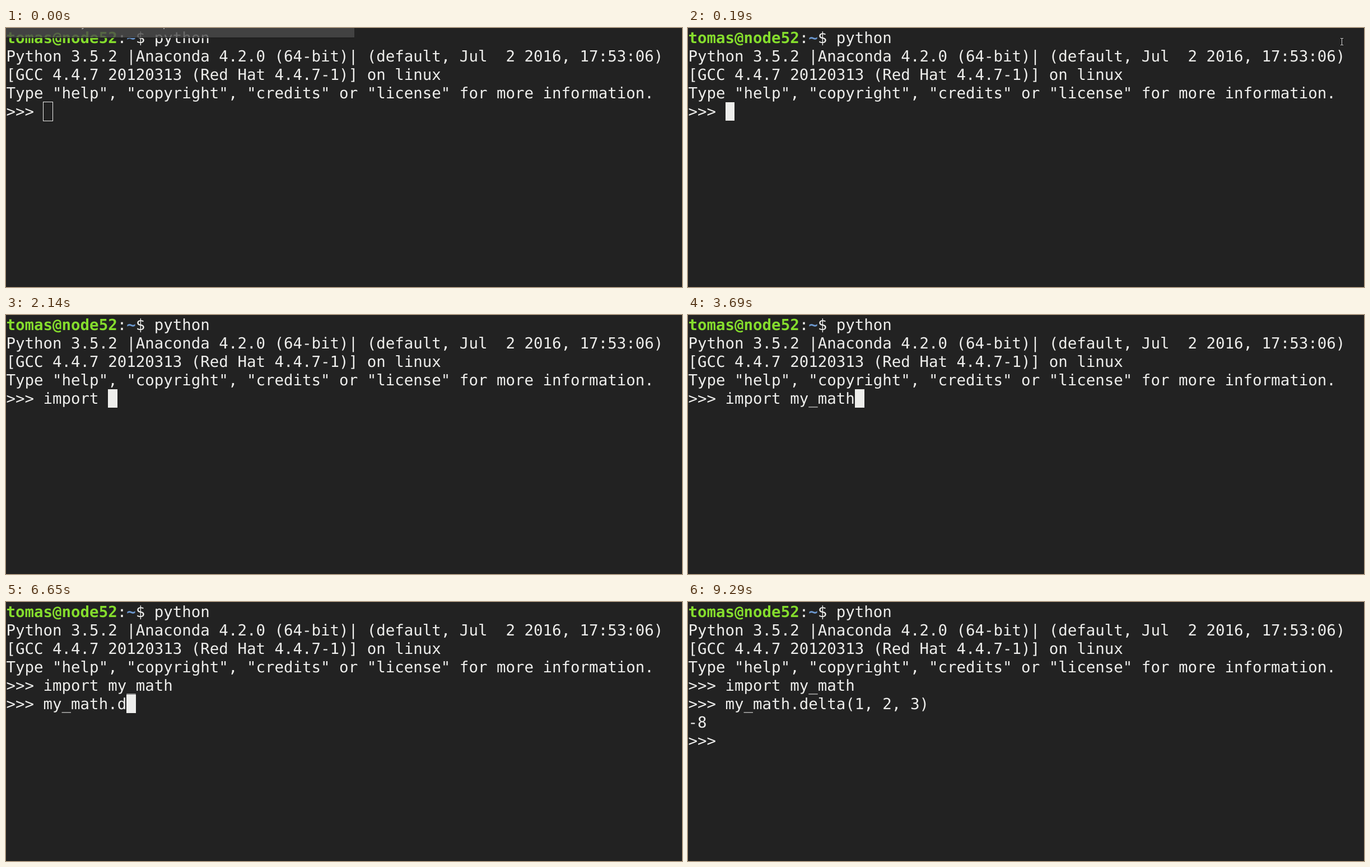
Recreate the animation shown at these times as an HTML page. Size 1207 px wide and 464 px high, loop 9.82 s.

```html
<!DOCTYPE html>
<html lang="en">
<head>
<meta charset="utf-8">
<title>Python session</title>
<style>
  html, body { margin: 0; width: 100%; height: 100%; overflow: hidden; background: #222; }
  #stage { position: relative; width: 1207px; height: 464px; overflow: hidden; background: #222; }
  #stage > * { position: absolute; }
  pre {
    left: .45px; top: 2px; margin: 0; color: #eeeeec;
    font: 27.455px/33px "DejaVu Sans Mono", monospace;
    text-rendering: geometricPrecision;
    font-variant-ligatures: none;
  }
  pre b { color: #85dd2d; }
  pre b.path { color: #6c98cf; }
  #cursor { box-sizing: border-box; height: 33px; background: #eeeeec; }
  #cursor.hollow {
    height: 35px; margin: -1px; padding-right: 2px; box-sizing: content-box;
    height: 33px; padding: 0; background: none; border: 1px solid #eeeeec;
  }
  #popup {
    left: 0; top: 0; width: 622px; height: 17px; overflow: hidden;
    background: rgba(74, 74, 74, .8); border-bottom: 1px solid #1a1a1a;
    font: 15px/18px "DejaVu Sans", sans-serif; color: #bbb;
  }
  #popup i { position: absolute; top: -15px; font-style: normal; }
  #wall { left: 0; top: 0; clip-path: polygon(0 0, 100% 0, 100% 100%, 602px 100%, 602px 82px, 0 82px); }
  #mouse { left: 1162px; top: 17px; }
</style>
</head>
<body>
<div id="stage">
  <pre><b>tomas@node52</b>:<b class="path">~</b>$ python
Python 3.5.2 |Anaconda 4.2.0 (64-bit)| (default, Jul  2 2016, 17:53:06)
[GCC 4.4.7 20120313 (Red Hat 4.4.7-1)] on linux
Type "help", "copyright", "credits" or "license" for more information.
<span id="typed">&gt;&gt;&gt; </span></pre>
  <div id="cursor"></div>
  <div id="popup"><i style="left:134px">y</i><i style="left:280px">p</i></div>
  <svg id="wall" width="1207" height="464" viewBox="0 0 1207 464">
    <defs>
      <linearGradient id="shade" gradientUnits="userSpaceOnUse" x1="850" y1="215" x2="925" y2="420">
        <stop offset="0" stop-color="#616161"/>
        <stop offset=".55" stop-color="#565656"/>
        <stop offset="1" stop-color="#505050"/>
      </linearGradient>
      <linearGradient id="edge" gradientUnits="userSpaceOnUse" x1="0" x2="90" y1="20" y2="0">
        <stop offset="0" stop-color="#525252"/>
        <stop offset="1" stop-color="#616161"/>
      </linearGradient>
      <filter id="soft" filterUnits="userSpaceOnUse" x="-60" y="-60" width="1340" height="600">
        <feGaussianBlur stdDeviation="12"/>
      </filter>
    </defs>
    <rect width="1207" height="464" fill="#6e6e6b"/>
    <g filter="url(#soft)">
      <path d="M-60-60H86L104 140H-60Z" fill="url(#edge)"/>
      <path d="M540 318C720 265 860 215 980 184S1150 95 1207 5L1260-60V540H540Z" fill="url(#shade)"/>
      <path d="M700 490C850 430 1060 390 1260 290V540H700Z" fill="#4b4b4b"/>
    </g>
    <circle cx="709" cy="50" r="31" fill="#2c2c2a"/>
  </svg>
  <svg id="mouse" width="12" height="16" fill="none">
    <path id="beam" d="M3 1.5H5L5.5 2L6 1.5H8M5.5 2V13M3 13.5H5L5.5 13L6 13.5H8" stroke="#111" stroke-width="3"/>
    <path d="M3 1.5H5L5.5 2L6 1.5H8M5.5 2V13M3 13.5H5L5.5 13L6 13.5H8" stroke="#eee"/>
  </svg>
</div>
<script>
  const LOOP = 9820, LEFT = .45, COL = 16.53, ROW = 33, FIRST_ROW = 4;
  const $ = id => document.getElementById(id);
  const typed = $("typed"), cursor = $("cursor");

  // [time in ms, text added at that time]
  const keys = [
    [0, ">>> "],
    [1210, "i"], [1310, "m"], [1410, "po"], [1510, "r"], [1610, "t"],
    [2140, " "], [2310, "m"], [2550, "y"], [2870, "_"],
    [3170, "ma"], [3330, "t"], [3690, "h"],
    [4250, "\n>>> "], [4910, "m"], [5370, "y"],
    [5700, "_"], [5800, "m"], [5910, "at"], [6290, "h."],
    [6650, "d"], [6790, "e"], [6930, "l"], [7070, "ta"], [7350, "("],
    [7640, "1,"], [7760, " 2"], [7880, ","], [7980, " "], [8150, "3"], [8330, ")"],
    [8720, "\n-8\n>>> "]
  ];
  const blinks = [[610, 1210], [4860, 4910], [9290, LOOP]];

  const within = (t, from, to) => t >= from && t < to;
  const show = (el, on) => { el.style.visibility = on ? "visible" : "hidden"; };
  const cellX = col => Math.round(LEFT + col * COL);

  function draw(t) {
    const text = keys.filter(k => k[0] <= t).map(k => k[1]).join("");
    if (typed.textContent !== text) typed.textContent = text;

    const lines = text.split("\n");
    const col = lines[lines.length - 1].length;
    cursor.style.left = cellX(col) + "px";
    cursor.style.width = cellX(col + 1) - cellX(col) + "px";
    cursor.style.top = 1 + (FIRST_ROW + lines.length - 1) * ROW + "px";
    cursor.className = t < 190 ? "hollow" : "";
    show(cursor, !blinks.some(([from, to]) => within(t, from, to)));

    show($("popup"), t < 50);
    show($("wall"), within(t, 140, 190));
    show($("mouse"), within(t, 140, 1210));
  }

  const start = performance.now();
  function tick() {
    draw((performance.now() - start) % LOOP);
    requestAnimationFrame(tick);
  }
  draw(0);
  requestAnimationFrame(tick);
</script>
</body>
</html>
```
